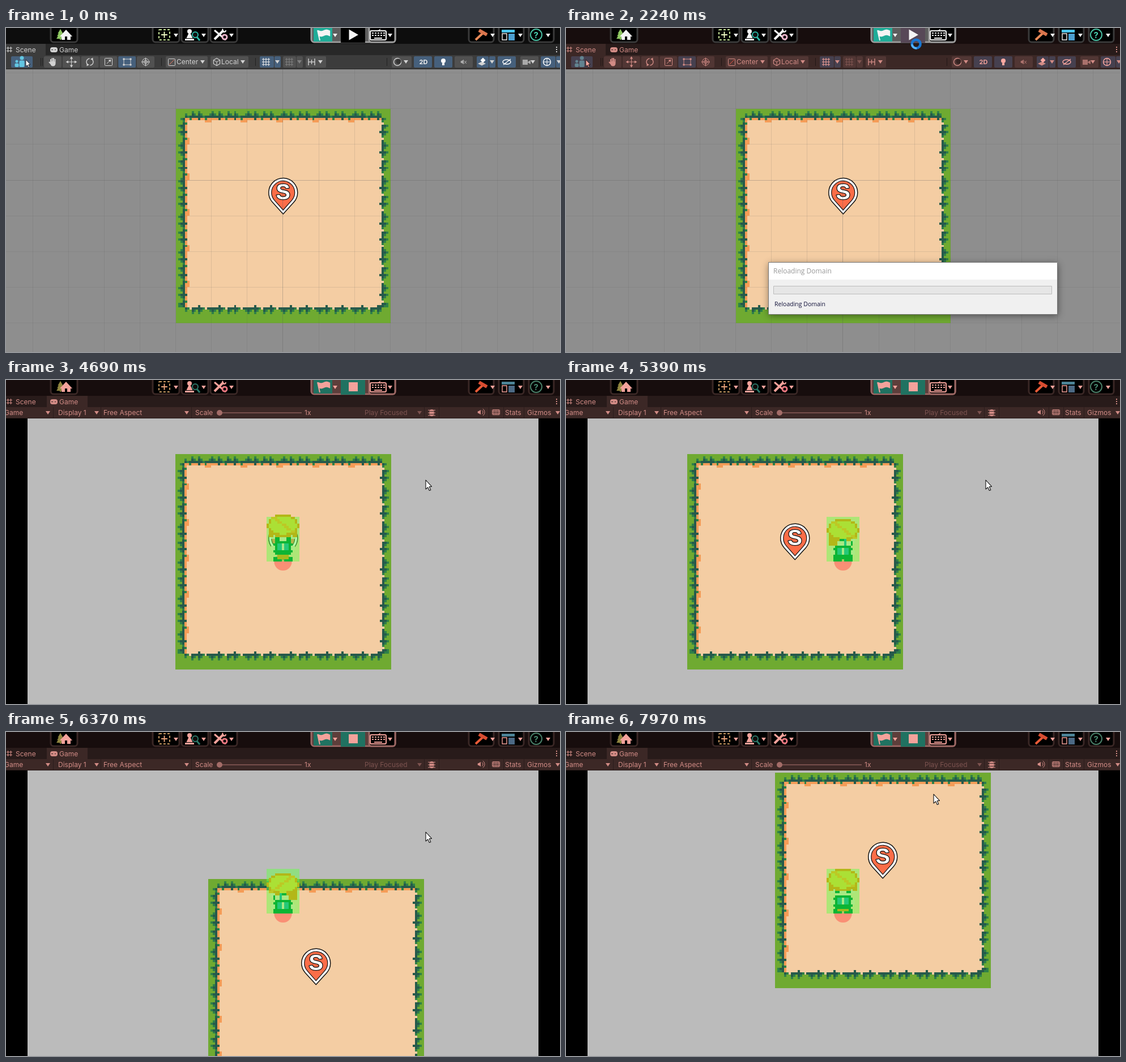
Animation of 978x573 px, one loop 8000 ms. Source, as an HTML page with a canvas:

```html
<!DOCTYPE html>
<html>
<head>
<meta charset="utf-8">
<style>
html, body { margin: 0; width: 100%; height: 100%; overflow: hidden; background: #000; }
canvas { display: block; }
</style>
</head>
<body>
<canvas id="stage" width="978" height="573"></canvas>
<script>
const LOOP = 8000, W = 978, H = 573;
const TEXT = '#d2d2d2', WHITE = '#f4f4f4', DIM = '#808080', TEAL = '#20ac98', TINT = '#ffa9a2';
let g = document.getElementById('stage').getContext('2d');

// ---- drawing helpers ----
function paint(fill, edge, width = 1.4) {
  if (fill) { g.fillStyle = fill; g.fill(); }
  if (edge) { g.strokeStyle = edge; g.lineWidth = width; g.stroke(); }
}
function rect(x, y, w, h, col) { g.fillStyle = col; g.fillRect(x, y, w, h); }
function round(x, y, w, h, r, fill, edge, width) {
  g.beginPath(); g.roundRect(x, y, w, h, r); paint(fill, edge, width);
}
function ring(x, y, r, fill, edge, width, from = 0, to = 7) {
  g.beginPath(); g.arc(x, y, r, from, to); paint(fill, edge, width);
}
function line(x, y, dx, dy, col = TEXT, width = 1.4) {
  g.beginPath(); g.moveTo(x, y); g.lineTo(x + dx, y + dy); paint(null, col, width);
}
// regular polygon; turn counts quarter turns of its first corner from the right
function ngon(n, x, y, r, turn, fill, edge, stretch = 1) {
  g.beginPath();
  for (let i = 0; i < n; i++) {
    const a = turn * Math.PI / 2 + i * 2 * Math.PI / n;
    g.lineTo(x + r * Math.cos(a) * stretch, y + r * Math.sin(a));
  }
  g.closePath(); paint(fill, edge, 1.2);
}
const caret = (x, y, col = TEXT) => ngon(3, x, y - 1, 4, 1, col, null, 1.15);
function text(s, x, y, col = TEXT, font = '12px Inter, sans-serif') {
  g.font = font; g.fillStyle = col; g.fillText(s, x, y);
}
function grid(x, y, w, h, nx, ny, col) {
  for (let i = 0; i < nx; i++) line(x + (i + .5) * w / nx, y, 0, h, col, 1);
  for (let i = 0; i < ny; i++) line(x, y + (i + .5) * h / ny, w, 0, col, 1);
}
function offscreen(w, h, draw) {
  const cv = document.createElement('canvas'), old = g;
  cv.width = w; cv.height = h;
  g = cv.getContext('2d'); draw(); g = old;
  return cv;
}

// ---- sand field with grass border: 6 x 6 tiles of 16 pixels ----
const field = offscreen(96, 96, () => {
  const dark = '#265a4b', mid = '#2f8147', orange = '#f59c57', sand = '#f4cda3';
  rect(0, 0, 96, 96, '#6faa31');
  rect(4, 4, 88, 85, sand);
  // put(i, d, colour): pixel i along the edge, d steps outward
  function edge(put, lit) {
    for (let i = 4; i < 92; i++) {
      const k = i % 16, m = k % 7;
      if (lit) { put(i, -1, orange); if (k > 12) put(i, -2, orange); }
      put(i, 0, m == 5 ? mid : dark);
      if (m == 6) put(i, lit ? -1 : 0, lit ? mid : sand);
      if (m == 1 || m == 4) put(i, 1, mid);
      if (k < 14 && (m == 0 || m == 3)) { put(i, 1, dark); put(i, 2, mid); if (m) put(i, -1, dark); }
    }
  }
  edge((i, d, col) => rect(i, 3 - d, 1, 1, col), true);
  edge((i, d, col) => rect(3 - d, Math.min(i, 88), 1, 1, col), true);
  edge((i, d, col) => rect(92 + d, Math.min(i, 88), 1, 1, col));
  edge((i, d, col) => rect(i, 89 + d, 1, 1, col));
});

function pin(x, y) {
  const drop = (r, tip) => {
    const a = Math.acos(r / tip), q = Math.PI / 2;
    g.beginPath(); g.arc(0, 0, r, q + a, q - a); g.lineTo(0, tip); g.closePath();
  };
  g.save(); g.translate(x, y); g.lineJoin = 'round';
  drop(25.5, 38); paint('#fff', '#111', 1.5);
  drop(20.5, 31); paint('#fb6d48', '#111', 1.2);
  g.textAlign = 'center'; g.font = 'bold 38px "Liberation Sans", sans-serif';
  g.lineWidth = 2.5; g.strokeText('S', 0, 12.5);
  text('S', 0, 12.5, '#fff', g.font);
  g.restore();
}
function drawField(x, y, size) {
  g.imageSmoothingEnabled = false;
  g.drawImage(field, x, y, size, size);
  pin(x + size / 2, y + size * .391);
}

// ---- little pixel hero ----
function blob(cx, cy, rx, ry, col) {
  for (let y = 0; y < 22; y++) for (let x = 0; x < 15; x++)
    if (((x + .5 - cx) / rx) ** 2 + ((y + .5 - cy) / ry) ** 2 <= 1) rect(x, y, 1, 1, col);
}
function makeHero(face, bob, blink) {
  return offscreen(15, 21, () => {
    const olive = '#b3b718', hair = '#abe035', skin = '#a9e984', dark = '#0cb534', teal = '#25c878';
    const mirrored = (x, y, w, h, col) => { rect(x, y, w, h, col); rect(15 - x - w, y, w, h, col); };
    if (face == 'left') { g.translate(15, 0); g.scale(-1, 1); }
    mirrored(3, 19, 4, 2, dark);
    rect(5, 18, 5, 2, '#a3bb1d');
    g.translate(0, 1 + bob);
    blob(7.5, 15, 5.5, 3, dark);
    mirrored(2, 14, 2, 2, skin);
    mirrored(5, 13, 2, 3, teal);
    rect(7, 13, 1, 3, skin);
    blob(7.5, 9, 5.8, 3.2, face == 'up' ? olive : skin);
    blob(7.5, 5, 7.2, 5, olive);
    blob(7.5, 4.7, 6.2, 4, hair);
    for (let i = 0; i < 9; i++) rect(2 + i * 7 % 11, 1 + i * 5 % 8, 2, 1, '#bcc925');
    if (face == 'down') {
      mirrored(1, 8, 2, 2, olive);
      mirrored(4, 10, 2, blink ? 1 : 3, dark);
    } else if (face != 'up') {
      rect(1, 8, 4, 4, olive);
      rect(8, 9, 1, 3, teal); rect(11, 10, 1, 2, dark); rect(6, 9, 2, 1, dark);
    }
  });
}
function drawHero(t, face, walking) {
  const step = Math.floor((t - 5130) / 150) & 1;
  ring(489, 321.5, 15.5, 'rgba(255,92,80,.55)');
  rect(460, 242, 58, 79, 'rgba(105,255,76,.5)');
  g.imageSmoothingEnabled = false;
  g.drawImage(makeHero(face, walking ? 2 - step : -step, t > 7900), 460, 238, 58, 83);
}

// ---- motion: key points are time, x, y and the facing on the way there ----
const pointerPath = [[100, 984, 572], [900, 667, 102], [1280, 612, 13], [1550, 612, 13], [1650, 618, 28],
  [2240, 618, 28], [3140, 741, 177], [7640, 741, 177], [7970, 649, 110]];
const fieldPath = [[5125, 299, 131], [5515, 174, 131, 'right'], [5720, 174, 202, 'up'],
  [5970, 232, 260, 'left'], [6410, 369, 260, 'left'], [7010, 369, 72, 'down']];
function along(way, t) {
  const n = way.findIndex(p => p[0] > t);
  if (n < 1) { const [, x, y] = n ? way.at(-1) : way[0]; return { x, y }; }
  const [a, b] = [way[n - 1], way[n]], u = (t - a[0]) / (b[0] - a[0]);
  return { x: a[1] + (b[1] - a[1]) * u, y: a[2] + (b[2] - a[2]) * u, face: b[3] };
}

// ---- editor chrome ----
function topIcons(t) {
  const live = t >= 4390, frame = (x, w) => round(x + 1, -6, w - 2, 31, 5, '#000', '#3a3a3a', 3);
  frame(78, 49);
  for (let i = 0; i < 3; i++) {
    frame(258 + 51 * i, 49); caret(300 + 49 * i, 13, WHITE);
    frame(816 + 53 * i, 46); caret(859 + 49 * i, 13, WHITE);
  }
  // tree and house
  for (const y of [7, 11, 15]) ngon(3, 96, y, y / 3 + 3, 3, '#8fc862');
  rect(95, 18, 2, 3, '#8fc862');
  ngon(3, 106, 11, 8, 3, WHITE, null, 1.6); rect(98, 13, 16, 8, WHITE); rect(104, 15, 4, 6, '#000');
  // dashed selection
  g.setLineDash([4, 3]); round(270, 3, 19, 18, 1, null, '#c9e89a', 2); g.setLineDash([]);
  line(274, 12, 11, 0, '#e7f3bd', 2); line(279.5, 6.5, 0, 11, '#e7f3bd', 2);
  // pawn and lens
  ring(324, 6, 4, WHITE); ngon(3, 324, 14, 8, 3, WHITE, null, .8); rect(316, 19, 16, 3, WHITE);
  ring(334, 12, 5, '#111', '#2bb5a4', 2); line(337, 16, 5, 6, '#2bb5a4', 3);
  // tools
  line(368, 4, 20, 17, WHITE, 3); line(368, 20, 16, -16, WHITE, 4);
  ring(385, 4, 3, null, WHITE, 2, 0, 4); ring(386, 16, 4, '#000', '#e9b4ca', 3);
  // play group
  round(539, -6, 148, 31, 5, '#5d5d5d', '#9b9b9b', 3);
  rect(543, 0, 33, 24, TEAL);
  line(550, 4, 4, 18, WHITE, 2);
  for (let x = 0; x < 21; x++) rect(551 + x, 4 + 1.3 * Math.sin(x / 3), 1.2, 10, WHITE);
  rect(591, 0, 43, 26, live ? TEAL : t >= 1180 ? '#574857' : '#000');
  if (live) rect(605, 4, 16, 16, WHITE); else ngon(3, 611, 12, 11, 0, WHITE);
  round(641, -6, 46, 31, 4, '#000', '#9b9b9b', 3);
  round(643, 5, 28, 16, 2, null, WHITE, 2); line(657, 5, 4, -3, WHITE);
  for (let i = 0; i < 10; i++) rect(646 + i % 5 * 5, 8 + (i > 4) * 4, 3, 2, WHITE);
  rect(650, 17, 14, 2, WHITE);
  caret(581, 13, WHITE); caret(678, 13, WHITE);
  // hammer, layout, help
  line(829, 21, 14, -13, '#e78958', 4); line(835, 4, 14, 8, '#d8744d', 6);
  rect(875, 3, 23, 5, '#4cc5ec'); round(876, 10, 8, 11, 0, null, WHITE); rect(887, 10, 11, 12, '#4c9fd0');
  ring(936, 12, 10, null, '#48bca0', 2);
  text('?', 931.5, 17.5, '#48d0b0', 'bold 15px Inter, sans-serif');
}
function playControls() {
  for (let i = 0; i < 3; i++) rect(566 + 32 * i, 4, 31, 18, i ? '#241a1a' : '#2c4c70');
  ngon(3, 580, 13, 6, 0, '#d8ffff');
  rect(610, 8, 3, 10, TEXT); rect(615, 8, 3, 10, TEXT);
  ngon(3, 642, 13, 5, 0, '#999'); rect(648, 8, 2, 10, '#999');
}
function tabs(game) {
  rect(0, 28, W, 20, '#282828');
  rect(game ? 72 : 0, 28, game ? 72 : 70, 20, '#3c3c3c');
  grid(1, 33, 10, 10, 2, 2, TEXT);
  text('Scene', 17, 43); text('Game', 94, 43);
  round(78, 34, 13, 9, 4, TEXT); rect(80, 38, 3, 1, '#333'); rect(86, 38, 2, 1, '#333');
  for (let i = 0; i < 3; i++) rect(971, 33 + 4 * i, 2, 2, TEXT);
}
function button(x, w, on, menu) {
  const fill = on ? '#46607c' : '#515151';
  round(x, 50, w, 20, 2, fill);
  if (menu) { round(x + w + 1, 50, 11, 20, 2, fill); caret(x + w + 6, 60, menu); }
}
function speaker(x, y, col) { rect(x, y - 2, 3, 4, col); ngon(3, x + 3, y, 5, 2, col, null, .8); }
function sceneBar() {
  rect(0, 48, W, 25, '#3c3c3c'); rect(0, 72, W, 1, '#262626');
  for (const x of [61, 64, 274, 440, 672]) rect(x, 53, 1, 14, '#222');
  // people
  button(9, 38, true);
  for (const r of [2.5, 3.5]) {
    const x = 9 * r - 3.5, y = 74 - 6 * r;
    ring(x, y, r, '#62c6e2'); round(x - r - 1, y + r + 1, 2 * r + 2, 68 - y - r, 2, '#62c6e2');
  }
  arrow(35, 56, .75);
  // six tools
  for (let i = 0; i < 6; i++) button(67 + 32.8 * i, 31, i == 4);
  for (let i = 0; i < 4; i++) {
    const a = i * Math.PI / 2, dx = Math.cos(a), dy = Math.sin(a);
    line(79 + 2.5 * i, 62, 0, i % 3 ? -9 : -7, TEXT, 2);
    line(115.5, 60, 7 * dx, 7 * dy, TEXT, 1); ngon(3, 115.5 + 7 * dx, 60 + 7 * dy, 3, i, TEXT);
    ring(214 + 6 * Math.sign(dx - dy), 60 + 5 * Math.sign(dx + dy), 1.8, TEXT);
  }
  ring(83, 63, 4.5, TEXT); line(76, 60, 4, 4, TEXT, 2);
  for (const a of [0, Math.PI]) ring(148, 60, 6, null, TEXT, 1.4, a - .9, a + 1.5);
  ngon(3, 144, 65, 3, 0, TEXT); ngon(3, 152, 55, 3, 2, TEXT);
  round(174.5, 53.5, 13, 13, 1, null, TEXT, 1); line(178, 63, 6, -6, TEXT, 1); ngon(3, 183.5, 57.5, 3, 3.5, TEXT);
  round(208, 55, 12, 10, 0, null, TEXT, 1);
  ring(246.5, 60, 6, null, TEXT, 1); ring(246.5, 60, 3, null, TEXT, 1); grid(239, 52.5, 15, 15, 1, 1, TEXT);
  // pivot and space
  button(282, 74); round(286.5, 54.5, 12, 12, 1, null, TEXT, 1); line(288, 65, 9, -9, '#e77864', 1);
  text('Center', 301, 64); caret(347, 60);
  button(361, 67); ngon(6, 372, 60, 6.5, 1, null, TEXT);
  for (let i = 0; i < 3; i++) ngon(2, 372, 60, 0, 0), line(372, 60, 6 * Math.sin(i * 2.1), 6 * Math.cos(i * 2.1), TEXT, 1);
  text('Local', 380, 64); caret(418, 60);
  // snapping
  button(448, 25, true, TEXT); grid(452, 53, 14, 14, 3, 3, '#eee');
  button(489, 23, false, DIM); grid(493, 53, 14, 14, 3, 3, DIM);
  button(529, 36);
  for (let i = 0; i < 3; i++) line(534 + 5.5 * i, 54 + i % 2 * 2, 0, 12 - i % 2 * 4);
  line(534, 60, 11, 0); caret(555, 60);
  // view options
  button(681, 35); ring(691, 60, 6.5, null, TEXT); ring(693, 59, 4.5, '#333'); caret(706, 60);
  button(720, 32, true); text('2D', 729.5, 64, '#eee', 'bold 11px Inter, sans-serif');
  button(756, 32, true); ring(772, 58, 4, '#fff'); rect(770, 62, 4, 4, '#fff');
  button(792, 32); speaker(803, 60, '#aaa'); line(809, 58, 4, 5, '#aaa', 1); line(813, 58, -4, 5, '#aaa', 1);
  button(831, 21, true, TEXT); ngon(4, 840, 63, 3.5, 0, TEXT, null, 2); ngon(4, 842, 57, 4.5, 0, '#fff');
  button(868, 32, true);
  g.beginPath(); g.ellipse(884, 60, 7, 4, 0, 0, 7); paint(null, '#fff'); line(878, 65, 13, -10, '#fff');
  button(908, 32); rect(912, 56, 9, 9, '#aaa'); ngon(3, 924, 60.5, 4, 2, '#aaa'); caret(930, 60);
  button(944, 26, true, TEXT); ring(955, 60, 6.5, null, '#fff'); grid(948, 53, 14, 14, 1, 1, '#fff');
}
function gameBar() {
  rect(0, 48, W, 20, '#3c3c3c'); rect(0, 67, W, 1, '#282828');
  for (const x of [83, 167, 327, 738, 764, 852, 878, 914]) rect(x, 48, 1, 19, '#2b2b2b');
  text('Game', -3, 62); caret(74, 58);
  text('Display 1', 92, 62); caret(160, 58);
  text('Free Aspect', 172, 62); caret(319, 58);
  text('Scale', 334, 62); rect(377, 57, 145, 2, '#777'); ring(377, 58, 5, '#a3a3a3'); text('1x', 527, 62);
  text('Play Focused', 633, 62, '#7c7c7c'); caret(730, 58, '#7c7c7c');
  grid(745, 51, 13, 14, 0, 3, TEXT); round(747.5, 52, 8, 12, 4, TEXT); grid(748, 53, 7, 10, 0, 2, '#444');
  speaker(833, 57, TEXT);
  for (const r of [4, 7]) ring(838, 57, r, null, TEXT, 1, -1, 1);
  round(858.5, 52.5, 13, 9, 1, null, TEXT, 1); grid(859, 53, 12, 8, 4, 2, TEXT);
  text('Stats', 881, 62); text('Gizmos', 920, 62); caret(974, 58);
}

// ---- views ----
function sceneView() {
  rect(0, 73, W, 500, '#8e8e8e');
  drawField(300, 143, 378.5);
  for (let i = -7; i <= 7; i++) {
    const col = `rgba(90,90,90,${i ? .15 : .32})`;
    rect(Math.round(488.4 + 63.1 * i), 73, 1, 500, col);
    if (Math.abs(i) < 5) rect(0, Math.round(268.5 + 63.1 * i), W, 1, col);
  }
}
function gameView(t) {
  rect(0, 68, W, 505, '#000');
  rect(38, 68, 902, 505, '#bbb');
  if (t < 4690) return;
  g.save(); g.beginPath(); g.rect(38, 68, 902, 505); g.clip();
  const { x, y, face } = along(fieldPath, t);
  drawField(Math.round(x), Math.round(y), 380.5);
  drawHero(t, face || 'down', !!face);
  g.restore();
}
function dialog(t) {
  const label = t < 2800 ? 'Reloading Domain' : 'Completing Domain';
  g.save(); g.shadowColor = 'rgba(0,0,0,.45)'; g.shadowBlur = 12; g.shadowOffsetY = 3;
  rect(358, 414, 510, 92, '#f0f0f0'); g.restore();
  rect(358, 414, 510, 31, '#fff');
  round(357.5, 414.5, 510, 92, 0, null, '#777', 1);
  text(label, 366, 434, '#999', '12px "Open Sans", sans-serif');
  round(366.5, 456.5, 491, 14, 0, '#e6e6e6', '#bcbcbc', 1);
  text(label, 368, 491.5, '#101038', '10.5px "Open Sans", sans-serif');
}
function arrow(x, y, size) {
  g.save(); g.translate(x, y); g.scale(size, size); g.lineJoin = 'round';
  g.stroke(new Path2D()); 
  const shape = new Path2D('M0 0V16L3.7 12.8 6.3 18.5 8.8 17.4 6.2 11.8 10.5 11.4Z');
  g.fillStyle = '#fff'; g.strokeStyle = '#111'; g.lineWidth = 1.1;
  g.fill(shape); g.stroke(shape);
  g.restore();
}
function pointer(t) {
  if (t < 100) return;
  const { x, y } = along(pointerPath, t), a = t / 160;
  if (t < 1620 || t >= 3500) return arrow(x, y, 1);
  ring(x, y, 7.5, null, '#1976d2', 4.5);
  ring(x, y, 7.5, null, '#58b4f5', 3.5, a, a + 1.6);
}
function draw(t) {
  const game = t >= 4020, tinted = t >= 1550;
  if (game) gameView(t); else sceneView();
  rect(0, 0, W, 28, tinted ? '#171313' : '#0d0d0d');
  if (t >= 4390) topIcons(t); else if (t >= 3920) playControls();
  tabs(game);
  if (game) gameBar(); else sceneBar();
  if (tinted) {
    g.globalCompositeOperation = 'multiply';
    rect(0, 0, W, game ? 68 : 73, TINT);
    g.globalCompositeOperation = 'source-over';
  }
  if (t < 3920) topIcons(t);
  if (t >= 2000 && t < 3330) dialog(t);
  pointer(t);
}

const start = performance.now();
(function tick() {
  draw((performance.now() - start) % LOOP);
  requestAnimationFrame(tick);
})();
</script>
</body>
</html>
```
